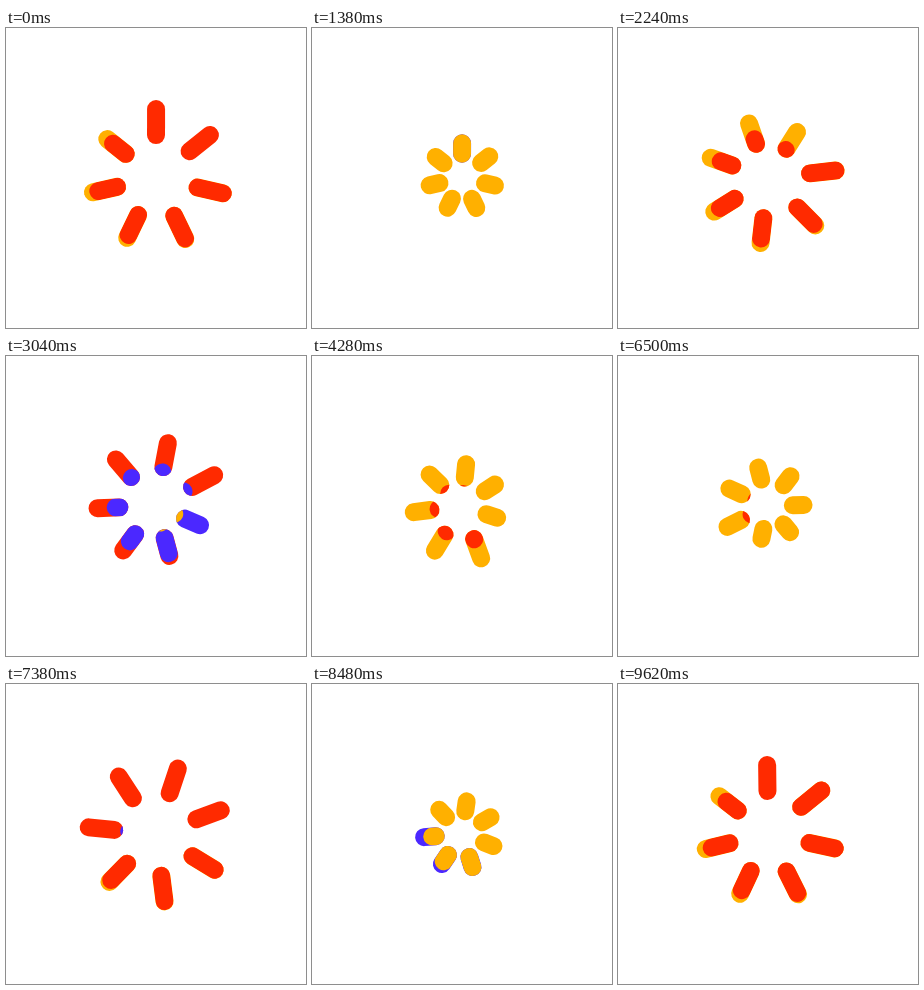
Recreate the animation shown at these times as an HTML page with a canvas. Size 300 by 300 pixels, loop 9.64 s.

```html
<!DOCTYPE html>
<html lang="en">
<head>
<meta charset="utf-8">
<title>Pulsing spokes</title>
<style>
  html, body { margin: 0; width: 100%; height: 100%; overflow: hidden; background: #fff; }
  canvas { display: block; width: 100vw; height: 100vh; object-fit: contain; }
</style>
</head>
<body>
<canvas id="stage" width="300" height="300"></canvas>
<script>
const ctx = document.getElementById('stage').getContext('2d');

const LOOP = 9640;          // one full turn
const PULSE = LOOP / 4;     // one breath through all three colours
const SPOKES = 7;
const STAGGER = 66;
const CAP = 9;              // half the line width
const TAU = Math.PI * 2;

const ORANGE = '#ffb000', RED = '#ff2a00', BLUE = '#4b28ff';

// Front of each colour, measured from the inner end of its spoke: [ms, px]
const redWave = [[1585, -18], [1870, 0], [2010, 16], [2215, 25], [2330, 28]];
const blueWave = [[105, -18], [386, 0], [500, 9], [600, 19]];
const orangeWave = [[540, -18], [800, 0], [990, 12]];

const layers = [
  { color: RED, keys: redWave, shift: PULSE },
  { color: BLUE, keys: blueWave, shift: 0 },
  { color: ORANGE, keys: orangeWave, shift: 0 },
  { color: RED, keys: redWave, shift: 0 }
];

const mod = (a, n) => ((a % n) + n) % n;

// -Infinity before the wave starts, Infinity once it has covered the spoke
function front(keys, time) {
  if (time < keys[0][0]) return -Infinity;
  for (let k = 1; k < keys.length; k++) {
    const [t0, v0] = keys[k - 1], [t1, v1] = keys[k];
    if (time < t1) return v0 + (v1 - v0) * (time - t0) / (t1 - t0);
  }
  return Infinity;
}

// Capsule along the x axis between two cap centres
function capsule(from, to) {
  ctx.beginPath();
  ctx.arc(from, 0, CAP, TAU / 4, TAU * 3 / 4);
  ctx.arc(to, 0, CAP, -TAU / 4, TAU / 4);
  ctx.closePath();
}

function drawSpoke(time) {
  const phase = TAU * (time + 25) / PULSE;
  const inner = 33 + 10 * Math.cos(phase);
  const outer = 51 + 18.7 * Math.cos(phase) - 0.7 * Math.cos(3 * phase);

  let base = ORANGE;
  let moving = [];
  for (const { color, keys, shift } of layers) {
    const f = front(keys, time + shift);
    if (f === Infinity) { base = color; moving = []; }
    else if (f > -Infinity) moving.push([color, inner + f]);
  }

  capsule(inner, outer);
  ctx.fillStyle = base;
  ctx.fill();
  ctx.clip();
  for (const [color, tip] of moving) {
    capsule(-40, tip);
    ctx.fillStyle = color;
    ctx.fill();
  }
}

function draw() {
  const t = performance.now() % LOOP;
  ctx.fillStyle = '#fff';
  ctx.fillRect(0, 0, 300, 300);
  for (let i = 0; i < SPOKES; i++) {
    ctx.save();
    ctx.translate(150, 150);
    ctx.rotate(TAU * (i / SPOKES + t / LOOP) - TAU / 4);
    drawSpoke(mod(t - i * STAGGER, PULSE));
    ctx.restore();
  }
  requestAnimationFrame(draw);
}
draw();
</script>
</body>
</html>
```
